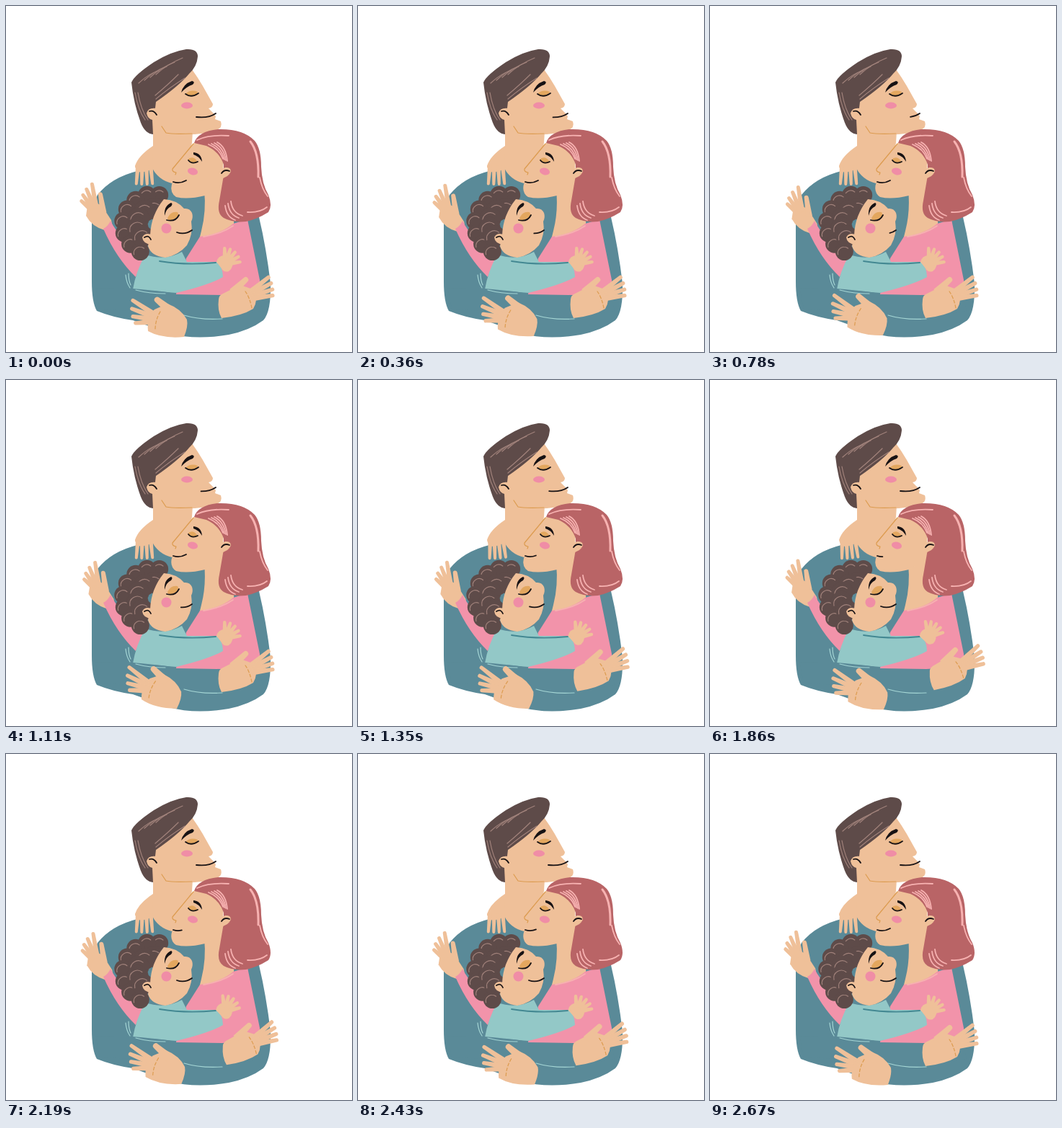
These frames come from a looping animation (480x480 px, 2.7 s). An HTML page:

```html
<!DOCTYPE html>
<html lang="en">
<head>
<meta charset="utf-8">
<title>Family hug</title>
<style>
html, body { margin: 0; height: 100%; overflow: hidden; background: #fff; }
svg { display: block; width: 100vw; height: 100vh; }
.skin { fill: #efc099; }
.teal { fill: #5a8a98; }
.pink { fill: #f293aa; }
.mint { fill: #93c8c7; }
.brown { fill: #5e4b49; }
.rose { fill: #b96466; }
.blush { fill: #f08da6; }
.lid { fill: #e3a75f; }
.ink { fill: #171214; }
.line { fill: none; stroke-linecap: round; stroke-linejoin: round; stroke-width: 1.2; }
.dark { stroke: #171214; stroke-width: 1.8; }
.gold { stroke: #dc9b4f; }
.shine { stroke: #a1827b; }
.glow { stroke: #f7b2b1; stroke-width: 1.8; }
.bold { stroke-width: 3; }
.pale { stroke: #a5d6d5; }
.shade { stroke: #438892; stroke-width: 1.8; }
.crease { stroke-dasharray: 4 3; }
</style>
</head>
<body>
<svg viewBox="0 0 480 480">
  <path class="teal" d="M119 300Q121 274 127 262Q146 238 182 229L230 222 300 240 351 293Q361 335 367 385Q368 424 357 436Q338 450 309 456Q262 464 226 454L176 436Q148 432 126 423Q119 411 119 382Z"/>

  <!-- father -->
  <path class="skin" d="M204 160L204 194Q183 208 179 222L182 230 203 225Q211 241 230 246L248 240 258 190 259 174Z"/>
  <path class="skin" d="M258 88Q266 99 273 111L287 136Q287 141 281 142L287 148 291 153 290 157 298 160Q301 169 292 172Q270 180 238 178Q216 178 205 166L203 143 215 118Z"/>
  <path class="line gold" d="M216 167L222 176Q230 178 258 177"/>
  <path class="brown" d="M174 106Q178 96 205 78Q229 63 250 60Q266 59 266 70Q265 84 254 94Q240 111 208 133L206 150 204 178Q193 177 187 162Q177 135 174 106Z"/>
  <g id="dadStrands" class="line shine"></g>
  <path class="skin" d="M209 142Q197 140 195 149Q197 157 203 158L204 178 212 178Z"/>
  <path class="line dark" d="M199 146Q205 144 209 151"/>
  <path class="ink" d="M243 120Q246 108 258 104Q263 105 259 109Q250 112 243 120Z"/>
  <path class="lid" d="M249 122Q256 115 266 119L264 124Q255 126 249 122Z"/>
  <path class="line dark" d="M249 122Q257 128 267 121"/>
  <ellipse class="blush" cx="251" cy="138" rx="8" ry="4.400"/>
  <path id="dadSmile" class="line dark" pathLength="1" d="M291 149Q281 156 264 154"/>
  <g id="shoulderHand" class="skin"></g>

  <!-- mother -->
  <path class="skin" d="M275 255Q278 285 271 312L268 324 293 320 316 304 318 238 296 236Z"/>
  <path class="pink" d="M269 320Q299 316 315 302L335 296 352 380 352 403 235 403 250 350Z"/>
  <path class="line glow" d="M274 320Q299 316 315 305"/>
  <path class="skin" d="M261 190L246 207 231 226Q230 230 236 231L232 237 234 241 230 247Q227 259 236 265Q252 269 276 263Q294 254 301 236L302 205 281 188Z"/>
  <path class="line gold" d="M260 191L231 226Q230 230 236 231L235 234"/>
  <path class="rose" d="M261 190Q266 174 294 171Q329 170 345 187Q354 198 354 223Q355 247 364 262Q370 277 364 286Q348 296 333 299Q315 301 302 294Q292 288 296 270L302 235 302 220Q296 202 278 194Z"/>
  <path class="line glow bold" d="M339 188Q351 203 350 237"/>
  <path class="line glow" d="M265 186Q282 178 309 180M352 238Q355 254 363 264M335 286Q352 287 362 279"/>
  <g id="mumStrands" class="line glow"></g>
  <path class="skin" d="M298 229Q302 222 310 225Q315 229 307 236L299 240Z"/>
  <path class="line dark" d="M299 232Q303 226 310 229"/>
  <path class="ink" d="M260 203Q271 204 272 216Q267 208 260 206Z"/>
  <path class="lid" d="M253 212Q261 207 266 217Q258 220 253 214Z"/>
  <path class="line dark" d="M253 214Q258 220 266 216"/>
  <ellipse class="blush" cx="259" cy="229.500" rx="7.200" ry="4.800" transform="rotate(15 259 229.500)"/>
  <path id="mumSmile" class="line dark" pathLength="1" d="M232 244Q241 247 250 242"/>

  <g id="raisedHand" class="skin"></g>
  <path class="pink" d="M145 298Q156 321 192 349L180 376Q153 350 135 309Q141 306 145 298Z"/>

  <!-- child -->
  <path class="mint" d="M193 345Q222 354 244 341L251 355 292 355Q301 362 301 376Q282 387 236 398L176 393Q180 369 193 345Z"/>
  <path class="line shade" d="M213 354Q249 360 291 356"/>
  <g id="curls"></g>
  <path class="skin" d="M219 268Q237 269 247 281Q255 280 258 287Q260 293 257 299Q260 316 251 332Q239 346 221 349Q201 347 197 333L200 318Q201 290 219 268Z"/>
  <path class="skin" d="M204 318Q193 313 189 321Q190 330 202 331Z"/>
  <path class="line dark" d="M192 321Q198 317 201 324"/>
  <path class="ink" d="M220 291Q219 277 229 273Q232 274 229 278Q222 281 220 291Z"/>
  <path class="lid" d="M224 294Q229 284 238 286L240 291Q232 298 225 297Z"/>
  <path class="line dark" d="M223 297Q235 300 240 290"/>
  <circle class="blush" cx="222.500" cy="308.500" r="7"/>
  <path id="kidSmile" class="line dark" pathLength="1" d="M258 311Q248 318 237 314"/>
  <g id="kidHand" class="skin"></g>

  <!-- embracing arms -->
  <path class="teal" d="M124 391L176 392Q234 397 236 400L300 401 350 398 356 423 298 434 215 427 130 420Z"/>
  <path class="line pale" d="M180 394Q198 399 221 399M247 429Q270 436 300 434M166 373Q167 384 172 391M170 371Q170 381 173 387"/>
  <g id="rightHand" class="skin"></g>
  <g id="leftHand" class="skin"></g>
</svg>
<script>
const LOOP = 2700;
const el = id => document.getElementById(id);
const mix = (a, b, k) => a + (b - a) * k;
const repeat = (n, make) => Array.from({ length: n }, (_, i) => make(i)).join('');

// Finger pointing along +x, tapering to a rounded tip.
function finger(x, y, angle, start, end, width) {
  const b = width / 2, r = width / 3;
  return `<path transform="translate(${x} ${y}) rotate(${angle})" ` +
    `d="M${start} ${-b}L${end - r} ${-r}a${r} ${r} 0 0 1 0 ${2 * r}L${start} ${b}Z"/>`;
}

// Fingers spread evenly around a point, from one angle and reach to another.
function fan(n, x, y, [fromAngle, toAngle], start, [fromReach, toReach], width) {
  return repeat(n, i => {
    const k = i / (n - 1);
    return finger(x, y, mix(fromAngle, toAngle, k), start, mix(fromReach, toReach, k), width);
  });
}

function hand(id, palm, fingers, crease = '') {
  el(id).innerHTML = `<path d="${palm}"/>${fingers}<path class="line gold crease" d="${crease}"/>`;
}

hand('shoulderHand', 'M203 200Q184 209 179 223L182 230Q194 232 204 225Z',
  fan(4, 191, 130, [95, 84], 92, [119, 119], 6));
hand('raisedHand', 'M113 277Q123 270 133 277L146 297 148 307 137 311Q119 306 111 291Z',
  fan(4, 127, 290, [-139, -100], 9, [32, 46], 7.5) + finger(135, 287, -99, 0, 29, 9));
hand('kidHand', 'M292 355Q294 346 304 346L313 351Q317 362 309 368Q302 370 299 364Z',
  fan(5, 304, 358, [-92, -8], 6, [24, 23], 6.5));
hand('rightHand', 'M295 407Q295 401 303 398L325 387 345 394Q350 409 343 420Q327 430 299 433Q293 422 295 407Z',
  fan(4, 325, 408, [-39, -8], 16, [53, 48], 8) + finger(314, 397, -43, 0, 29, 11),
  'M332 396Q338 404 341 419');
hand('leftHand', 'M206 421L224 413Q243 420 251 435Q253 444 247 459Q217 462 197 451Q195 431 206 421Z',
  fan(4, 220, 437, [-147, -184], 14, [55, 43], 8) + finger(230, 424, -141, 0, 30, 12),
  'M214 424Q207 436 207 449');

// Two rings of curls around the child's head.
function curl(angle, ring, r) {
  const x = 204 + ring * Math.cos(angle), y = 303 + ring * Math.sin(angle), a = r * 0.7;
  return `<circle class="brown" cx="${x}" cy="${y}" r="${r}"/>` +
    `<path class="line shine" d="M${x - a} ${y + a / 2}A${a} ${a} 0 0 1 ${x + a * 0.6} ${y - a / 2}"/>`;
}
el('curls').innerHTML = repeat(8, i => curl(-1.36 - i * 0.416, 41.5, 12.5)) +
  repeat(5, i => curl(-1.5 - i * 0.62, 22, 15));

const strands = (n, make) => repeat(n, i => `<path d="${make(i)}"/>`);
el('dadStrands').innerHTML =
  strands(4, i => `M${184 + 8 * i} ${107 - 4 * i}q15 -14 ${28 + 3 * i} ${-17 - 2 * i}`) +
  strands(2, i => `M${208 - i} ${129 - 5 * i}q19 -16 ${40 - 8 * i} -29`) +
  strands(2, i => `M${179 + 4 * i} 120q4 24 14 38`);
el('mumStrands').innerHTML =
  strands(4, i => `M${281 + 4 * i} ${192 - i}q${15 - i} 6 ${20 - 2 * i} ${20 + 2 * i}`) +
  strands(3, i => `M${304 + 4 * i} ${277 - 3 * i}q2 16 ${14 + i} 20`);

// Linear rise to 1 at the peak and back to 0.
function pulse(t, start, peak, end) {
  if (t <= start || t >= end) return 0;
  return t < peak ? (t - start) / (peak - start) : (end - t) / (end - peak);
}

function pose(id, k, dx, dy, turn, px, py) {
  el(id).setAttribute('transform', `translate(${dx * k} ${dy * k}) rotate(${turn * k} ${px} ${py})`);
}

function smile(id, length) {
  el(id).setAttribute('stroke-dasharray', `${length} 2`);
}

function draw(now) {
  const t = now % LOOP;
  const hug = pulse(t, 0, 1200, LOOP);
  const late = pulse(t, 1140, 1700, 2670);
  pose('leftHand', hug, -9.5, -3.5, 6, 245, 445);
  pose('raisedHand', hug, 3.5, 7, 1, 137, 305);
  pose('rightHand', late, 12, -5, -5, 318, 410);
  pose('kidHand', late, -1, -1, -11, 300, 358);
  pose('shoulderHand', pulse(t, 1140, 1600, 2190), 0, 0, -7, 192, 215);
  smile('dadSmile', 1 - 0.5 * pulse(t, 0, 780, 1400));
  smile('kidSmile', 1 - 0.65 * pulse(t, 0, 700, 1400));
  smile('mumSmile', 1 - 0.6 * pulse(t, 1140, 1860, 2660));
  requestAnimationFrame(draw);
}
requestAnimationFrame(draw);
</script>
</body>
</html>
```
